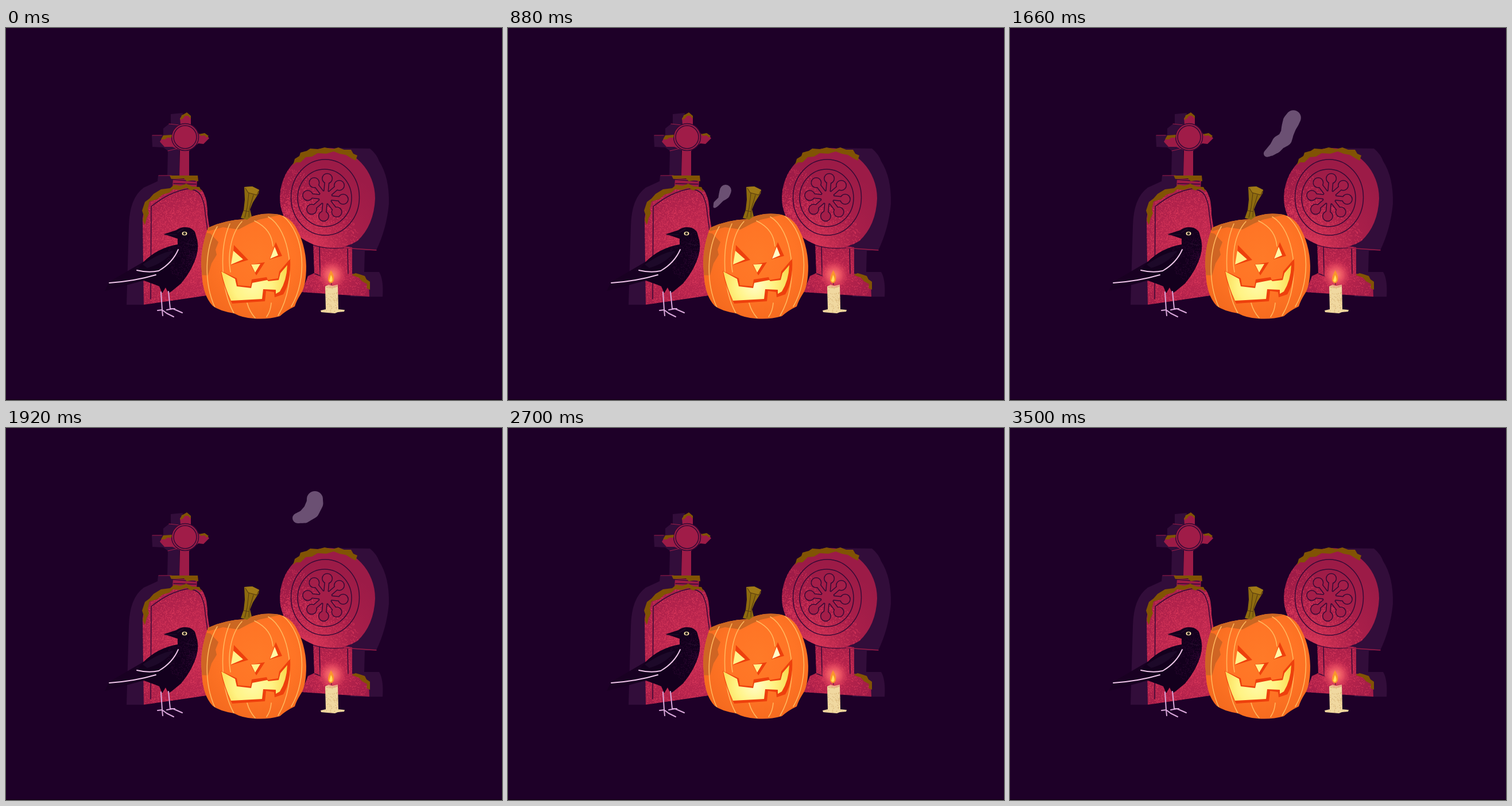
An HTML page with a canvas for the animation above (3.6 s loop, 864 px wide and 648 px high).

```html
<!DOCTYPE html>
<html lang="en">
<head>
<meta charset="utf-8">
<title>Pumpkin among gravestones</title>
<style>
html, body { margin: 0; width: 100%; height: 100%; overflow: hidden; background: #1e0028; }
canvas { display: block; }
</style>
</head>
<body>
<canvas id="stage" width="864" height="648"></canvas>
<script>
const W = 864, H = 648, LOOP = 3600, STEP = 130;
const NIGHT = '#1e0028', SIDE = '#320d3a', STONE = '#9c1b47', LIT = '#d8385b', CUT = '#350a36',
  MOSS = '#815304', RED = '#ee400d', SMOKE = '#6b5073';
const screen = document.getElementById('stage').getContext('2d');
const scene = document.createElement('canvas');
scene.width = W;
scene.height = H;
let g = scene.getContext('2d');

let seed = 7;
function rand() {
  seed = (seed * 16807) % 2147483647;
  return seed / 2147483647;
}

function fill(d, color) {
  g.fillStyle = color;
  g.fill(new Path2D(d));
}

function line(d, color, width = 1.5) {
  g.strokeStyle = color;
  g.lineWidth = width;
  g.lineCap = g.lineJoin = 'round';
  g.stroke(new Path2D(d));
}

function oval(x, y, rx, ry = rx) {
  g.beginPath();
  g.ellipse(x, y, rx, ry, 0, 0, 7);
}

function ring(x, y, rx, ry, color, width = 1.5) {
  oval(x, y, rx, ry);
  g.strokeStyle = color;
  g.lineWidth = width;
  g.stroke();
}

function radial(x, y, r, ...stops) {
  const paint = g.createRadialGradient(x, y, 0, x, y, r);
  stops.forEach((c, i) => paint.addColorStop(i / (stops.length - 1), c));
  return paint;
}

// Speckled light spreading from a point, kept inside a shape
function grain(d, x, y, radius, count, color = LIT) {
  g.save();
  g.clip(new Path2D(d));
  g.fillStyle = color;
  for (let i = 0; i < count; i++) {
    const a = rand() * 2 * Math.PI, r = radius * rand() ** 0.8;
    g.fillRect(x + r * Math.cos(a), y + r * Math.sin(a), 1.2, 1.2);
  }
  g.restore();
}

function leftStone() {
  fill('M210 482L214 345Q215 296 240 278L264 267L265 257L292 256L302 276L250 300L240 482Z', SIDE);
  fill('M287 150L308 148L306 167L318 170L302 212V258H281L282 214L274 208L255 207L254 187L274 186V175L284 167H287Z', SIDE);
  line('M255 187H271M284 167L302 169M282 214L299 210M266 257H288', STONE, 1.2);

  fill('M304 168L303 157L313 149L322 154V170L333 180L337 185L347 184L354 192L344 202L335 201L319 214V258H302L303 213L290 207H276L268 198L273 190L289 186Z', STONE);
  oval(312, 190, 23.5);
  g.fillStyle = '#a01c48';
  g.fill();
  ring(312, 190, 23.5, 23.5, CUT);
  ring(312, 190, 20, 20, CUT);
  fill('M303 160L306 152L310 150L315 147L322 153L322 158L317 153L312 153L308 158Z', MOSS);
  fill('M270 194L274 187L289 186L288 191L281 191L277 194Z', MOSS);
  fill('M336 185L346 183L353 188L350 191L346 187L340 188Z', MOSS);

  const body = 'M240 482L238 332Q241 304 265 291L288 279Q320 273 341 282Q351 296 351 325L356 360V465Z';
  fill('M291 262L333 264L332 280L290 278Z', STONE);
  fill(body, radial(330, 390, 150, '#c62b50', '#b7244d', STONE));
  grain(body, 310, 390, 120, 6500);
  line('M252 472L253 311Q283 286 317 280Q334 282 339 291Q346 304 347 322L351 352', CUT);
  line('M291 264L330 267M292 271L331 272', CUT);
  fill('M285 257L334 257L335 267L326 265L315 267L310 262L288 263Z', MOSS);
  fill('M242 343L238 335L240 327L237 318L242 303L250 297L257 289L270 281L286 279L293 273L304 275L314 271L324 276L337 277L341 285L331 280L322 283L314 278L303 282L291 281L284 287L273 290L264 298L250 302L247 315L249 323L245 331Z', MOSS);
}

function rosette(color, grow) {
  g.fillStyle = g.strokeStyle = color;
  g.lineWidth = 6 + 2 * grow;
  for (let i = 0; i < 8; i++) {
    const a = i * Math.PI / 4 - 1.47;
    const x = 556.5 + 31 * Math.cos(a), y = 295 + 33 * Math.sin(a);
    g.beginPath();
    g.moveTo(556.5, 295);
    g.lineTo(x, y);
    g.stroke();
    oval(x, y, 8 + grow);
    g.fill();
  }
  oval(556.5, 295, 11 + grow);
  g.fill();
}

function rightStone() {
  fill('M565 209L634 210Q646 220 650 232Q668 260 667 306Q663 350 645 387L625 388L624 425L650 425Q658 438 656 468L600 468V384L560 380Z', SIDE);
  const foot = 'M535 372L603 382V428Q625 430 632 446L633 468L515 460L526 432L537 427Z';
  fill(foot, radial(566, 430, 70, '#c42a50', '#b2224b', '#a01c48'));
  grain(foot, 560, 425, 75, 1700);
  line('M546 381L547 430M595 384L596 428M538 428L548 432', CUT);

  const disc = 'M477 297A83 88 0 0 1 643 297Q641 344 612 371Q590 385 560 382Q536 381 512 364Q478 335 477 297Z';
  fill(disc, radial(530, 385, 150, '#d23554', '#aa1f4a', STONE));
  grain(disc, 535, 375, 80, 2200);
  grain(disc, 490, 320, 75, 1700);
  ring(556, 295, 59.5, 66, CUT);
  ring(555, 296, 47, 50, CUT);
  rosette(CUT, 1.5);
  rosette('#a41e49', 0);
  line('M588 383L645 387', STONE, 1.3);
  line('M535 378Q558 386 588 383', CUT, 1.2);
  fill('M500 239L503 228L511 223L513 217L524 214L530 210L544 211L555 208L569 211L579 208L589 212L601 212L605 219L612 222L609 231L600 226L592 221L581 219L571 215L558 219L543 218L533 224L522 225L513 234L505 234Z', MOSS);
  fill('M602 430L609 427L616 429L625 432L628 438L634 442V456L628 453L629 446L620 441L615 435Z', MOSS);
}

function pumpkin() {
  const skin = 'M352 348Q382 334 417 333Q440 321 469 324Q490 326 503 344Q522 375 523 415Q523 450 513 464Q506 475 503 485Q488 492 477 502Q455 508 431 506Q412 505 397 497Q372 493 360 484Q342 465 341 425Q337 388 352 348Z';
  fill(skin, radial(440, 400, 125, '#ff7a28', '#ff7425', '#f2681d'));
  g.save();
  g.clip(new Path2D(skin));
  fill('M340 355L356 358L370 373L365 386L367 395L358 410L352 431L338 430Z', '#cf6524');
  fill('M350 347L385 335L418 332L450 322L486 324L462 329L440 334L424 341L405 351L378 347L352 354Z', '#cb6722');
  line('M368 346C345 385 345 445 364 487M390 341C371 382 374 455 397 497M411 337C390 360 386 400 391 425M420 479Q424 494 434 505M433 336C455 347 463 361 465 380M462 479Q461 493 454 503M457 329C494 350 510 440 474 501M482 327C522 360 525 438 497 485', '#ffb65c', 1.6);
  g.restore();

  fill('M415 277L429 276L441 282L440 288L430 304L425 316L428 328L420 334L409 331L414 317L416 299Z', '#8e6b0f');
  fill('M415 277L429 276L441 282L437 290L422 286Z', '#9f7916');
  line('M417 279L422 287L437 291L440 284M423 288L420 313L416 330M431 291L424 315L423 329M414 318L424 320', '#5a3d10', 1.1);

  fill('M397 378L422 404L392 413L396 393Z', RED);
  fill('M470 373L481 397L459 403L465 387Z', RED);
  fill('M426 412L451 408L436 431Z', RED);
  fill('M374 423L402 436L404 448L426 450L428 438L454 434L456 439L474 436L476 424L495 402Q497 441 483 464L468 469L467 460L453 458L451 476L394 480Q379 453 374 423Z', RED);
}

function crow() {
  fill('M240 440L172 458L180 442L240 407L262 425Z', '#190022');
  const bird = 'M275 359L297 352Q306 345 320 348Q330 352 331 362Q337 378 332 396Q325 421 305 445L288 459L283 462L278 452L272 462L267 450Q252 444 240 440L228 422L240 407Q264 383 299 377V367L287 363Z';
  fill(bird, '#13001d');
  grain(bird, 326, 400, 46, 900, '#2b0730');
  fill('M238 412Q270 390 292 388Q275 410 246 418Z', '#1d0929');
  line('M276 360L297 360M309 350L299 356M314 375L329 379', '#26102f', 1.2);
  line('M300 386Q290 409 266 423Q249 427 228 422M180 444Q224 441 261 430', '#edc6e8', 1.9);
  line('M270 460L272 491M264 492L272 491L280 497L292 503M272 491L273 501M283 459L286 489M280 491L291 489L307 496M286 489L294 489', '#dba9dc', 2);
  oval(311, 358, 4.5, 3.3);
  g.fillStyle = '#f3dfa2';
  g.fill();
  oval(311, 358, 2.3);
  g.fillStyle = '#100019';
  g.fill();
}

function candle() {
  const wax = 'M556 450L562 447L568 449L578 447L579 490L590 491L589 494L578 495L573 497L560 496L549 495L548 492L557 490Z';
  fill(wax, '#f0d8a0');
  grain(wax, 576, 474, 30, 160, '#d8b578');
  line('M557 451Q567 455 577 450', '#d6af70', 1);
}

function drawScene() {
  g.fillStyle = NIGHT;
  g.fillRect(0, 0, W, H);
  g.fillStyle = '#10000f';
  g.fillRect(0, 647, W, 1);
  leftStone();
  rightStone();
  pumpkin();
  crow();
  candle();
}

// Light in the face and the candle flame; power runs from 0 to 1
function glow(power, sway) {
  const core = power > 0.3 ? '#fffcc8' : '#fff9a6';
  fill('M375 424L399 437L402 450L427 453L429 444L455 439L457 441L475 439L478 427L490 413Q489 440 477 459L470 463V456L448 455L446 472L392 475Q381 452 375 424Z',
    radial(430, 448, 66, core, '#fff384', '#f9d64a'));
  fill('M396 388L413 403L392 412Z', '#fff28a');
  fill('M468 381L474 396L460 402Z', core);
  fill('M427 412L443 411L434 426Z', '#fff28a');
  oval(568, 427, 25);
  g.fillStyle = radial(568, 430, 25, 'rgba(255,140,112,.95)', 'rgba(242,90,102,.75)', 'rgba(225,60,90,0)');
  g.fill();
  line('M567 447L566 438', '#4b202c', 1.2);
  fill(`M${566 + sway} 422Q573 433 571 440Q566 449 561 440Q560 434 ${566 + sway} 422Z`, '#f9942c');
  fill(`M${566 + sway / 2} 430Q570 437 568 441Q565 444 563 440Z`, '#ffe05b');
}

// Each puff is a chain of x, y, radius beads, from tail to head
const puffs = [
  [6, [[358, 312, 1], [361, 308, 2], [363, 305, 3], [366, 301, 4], [368, 298, 5]]],
  [7, [[360, 311, 2.5], [363, 306, 5], [371, 298, 5], [377, 289, 9.5], [379, 283, 10]]],
  [10, [[358, 311, 2], [366, 302, 6], [376, 289, 9], [383, 275, 11], [399, 268, 10], [405, 251, 7], [408, 233, 10], [417, 216, 14], [427, 205, 12]]],
  [15, [[508, 157, 9], [520, 154, 11.5], [532, 144, 14], [538, 131, 14.5], [538, 124, 14]]],
  [17, [[562, 107, 4], [566, 104, 5], [570, 100, 6], [573, 95, 6], [574, 93, 5]]]
];
const mix = (a, b, f) => a.map((v, i) => v + (b[i] - v) * f);

function beadAt(beads, u) {
  const p = u * (beads.length - 1), i = Math.min(Math.floor(p), beads.length - 2);
  return mix(beads[i], beads[i + 1], p - i);
}

function smoke(step) {
  const next = puffs.findIndex(p => p[0] >= step);
  if (step < puffs[0][0] || next < 0) return;
  const [end, to] = puffs[next], [start, from] = puffs[Math.max(next - 1, 0)];
  const f = end === start ? 1 : (step - start) / (end - start);
  g.fillStyle = SMOKE;
  g.beginPath();
  for (let i = 0; i <= 80; i++) {
    const [x, y, r] = mix(beadAt(from, i / 80), beadAt(to, i / 80), f);
    g.moveTo(x + r, y);
    g.arc(x, y, r, 0, 2 * Math.PI);
  }
  g.fill();
}

drawScene();
g = screen;
function frame() {
  const step = Math.floor((performance.now() % LOOP + 30) / STEP);
  const power = Math.max(0, 1 - Math.abs(step % 13 - 7) / 1.5);
  g.drawImage(scene, 0, 0);
  smoke(step);
  glow(power, Math.sin(step * 2.1) * 0.7);
  requestAnimationFrame(frame);
}
frame();
</script>
</body>
</html>
```
